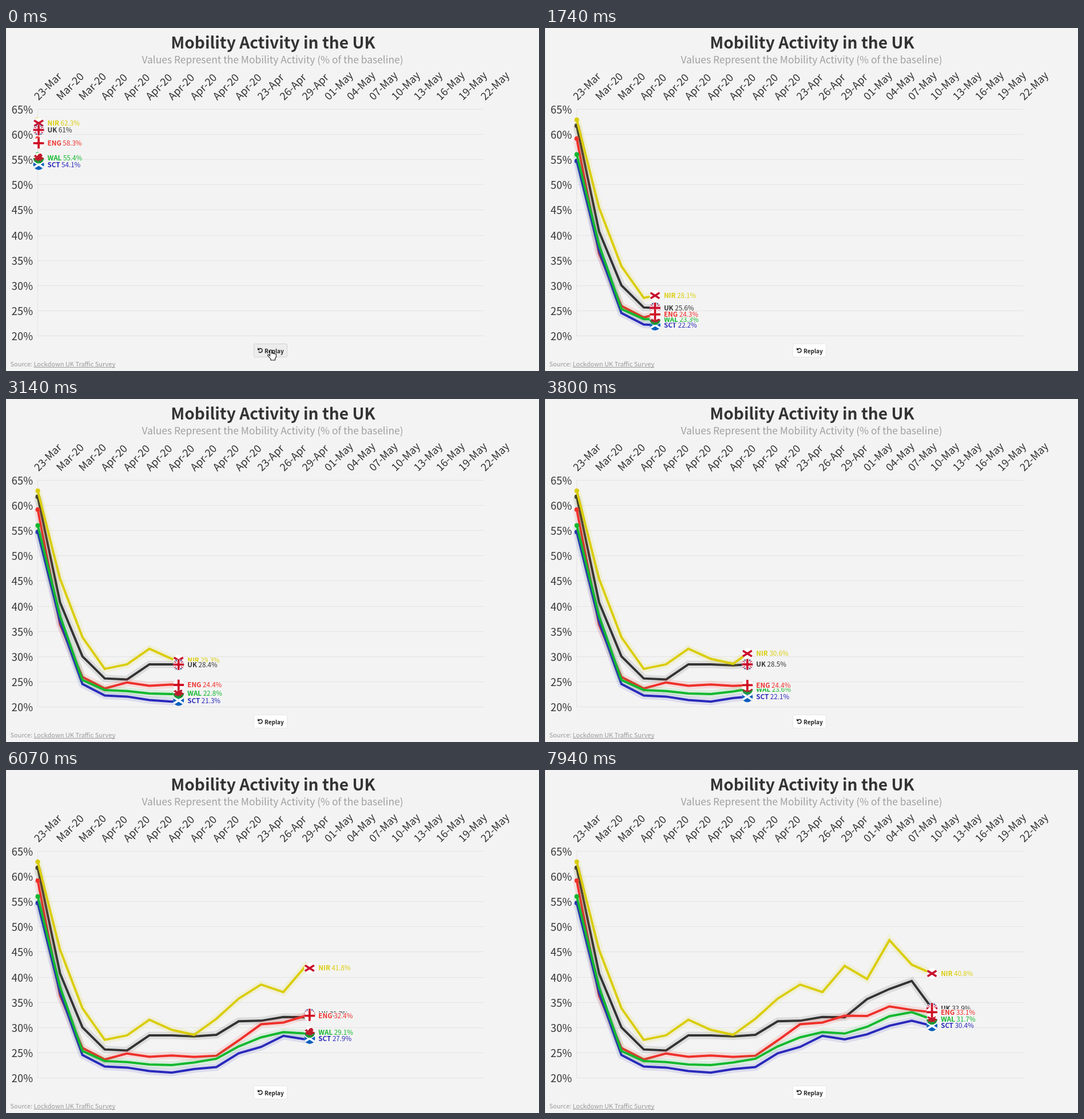
An HTML page with a canvas for the animation above (8 s loop, 932 by 601 pixels).

```html
<!DOCTYPE html>
<html lang="en">
<head>
<meta charset="utf-8">
<title>Mobility Activity in the UK</title>
<style>
  html, body { margin: 0; width: 100%; height: 100%; overflow: hidden; background: #f3f3f3; }
  canvas { display: block; }
</style>
</head>
<body>
<canvas id="stage" width="932" height="601"></canvas>
<script>
const ctx = document.getElementById('stage').getContext('2d');
const FAMILY = '"Noto Sans CJK SC", "Noto Sans CJK JP", "Noto Sans CJK", sans-serif';
const BACKGROUND = '#f3f3f3', INK = '#333';
const LOOP = 8000, FRAMES_PER_SECOND = 15, STEPS_PER_SECOND = 2, START = 0.04;
const LEFT = 55.5, STEP = 39.05, TOP = 143, PER_CENT = 8.82, FLAG_RADIUS = 9.5;

const dates = ['23-Mar', 'Mar-20', 'Mar-20', ...Array(7).fill('Apr-20'), '23-Apr', '26-Apr', '29-Apr',
  '01-May', '04-May', '07-May', '10-May', '13-May', '16-May', '19-May', '22-May'];

const series = {
  NIR: { color: '#dacd0b', values: [63, 45.5, 33.9, 27.6, 28.5, 31.6, 29.6, 28.6, 31.8, 35.8, 38.6, 37.1, 42.3, 39.7, 47.4, 42.55, 40.6] },
  UK: { color: '#333333', values: [61.8, 40.8, 30.1, 25.7, 25.5, 28.5, 28.5, 28.3, 28.6, 31.3, 31.4, 32.15, 32.1, 35.7, 37.7, 39.3, 33.3] },
  ENG: { color: '#ef302b', values: [59.25, 36.4, 26, 23.7, 24.9, 24.25, 24.5, 24.2, 24.45, 27.5, 30.7, 31.05, 32.4, 32.35, 34.25, 33.55, 33.05] },
  WAL: { color: '#12b82f', values: [56.1, 38.1, 25.4, 23.4, 23.2, 22.7, 22.6, 23.1, 23.85, 26.3, 28.1, 29.15, 28.85, 30.2, 32.3, 33.1, 31.55] },
  SCT: { color: '#2a2abb', values: [54.8, 37, 24.6, 22.3, 22.1, 21.4, 21.1, 21.8, 22.2, 24.95, 26.2, 28.4, 27.7, 28.7, 30.4, 31.4, 30.3] }
};
const lineOrder = ['UK', 'ENG', 'SCT', 'WAL', 'NIR'];
const headOrder = ['NIR', 'UK', 'SCT', 'WAL', 'ENG'];

const xAt = index => LEFT + STEP * index;
const yAt = value => TOP + (65 - value) * PER_CENT;

function valueAt(values, position) {
  const i = Math.floor(position);
  return values[i] + (values[i + 1] - values[i]) * (position - i);
}

function write(text, x, y, size, { weight = 400, color = INK, align = 'left', halo = 0 } = {}) {
  ctx.font = `${weight} ${size}px ${FAMILY}`;
  ctx.textAlign = align;
  if (halo) {
    ctx.lineJoin = 'round';
    ctx.strokeStyle = BACKGROUND;
    ctx.lineWidth = halo;
    ctx.strokeText(text, x, y);
    ctx.lineJoin = 'miter';
  }
  ctx.fillStyle = color;
  ctx.fillText(text, x, y);
  return ctx.measureText(text).width;
}

function path(points, color, width) {
  ctx.beginPath();
  points.forEach(([x, y]) => ctx.lineTo(x, y));
  ctx.strokeStyle = color;
  ctx.lineWidth = width;
  ctx.stroke();
}

function disc(x, y, radius, color) {
  ctx.beginPath();
  ctx.arc(x, y, radius, 0, 7);
  ctx.fillStyle = color;
  ctx.fill();
}

function fillRect(color, ...box) {
  ctx.fillStyle = color;
  ctx.fillRect(...box);
}

function cross(color, width) {
  path([[-12, 0], [12, 0]], color, width);
  path([[0, -12], [0, 12]], color, width);
}

function saltire(color, width, rise = 7.5) {
  path([[-12, -rise], [12, rise]], color, width);
  path([[-12, rise], [12, -rise]], color, width);
}

const flags = {
  NIR() { saltire('#c8102e', 3.6); },
  UK() {
    fillRect('#1d2a70', -10, -10, 20, 20);
    saltire('#fff', 4.5, 9);
    saltire('#c8102e', 1.4, 9);
    cross('#fff', 6.5);
    cross('#c8102e', 3.8);
  },
  ENG() { cross('#ce1124', 3.8); },
  WAL() {
    fillRect('#159a3a', -10, 0, 20, 10);
    ctx.fillStyle = '#c01a2c';
    ctx.fill(new Path2D('M-9-3L-5-6-3-3 0-7 4-8 7-4 5-2 9 0 7 3 4 2 5 6 1 4-2 6-3 3-7 5-6 1-9 1-5-1Z'));
  },
  SCT() {
    fillRect('#0b5fbd', -10, -10, 20, 20);
    saltire('#fff', 3.6);
  }
};

function drawFlag(name, x, y) {
  ctx.save();
  ctx.translate(x, y);
  disc(0, 0, FLAG_RADIUS, '#fff');
  ctx.clip();
  flags[name]();
  ctx.restore();
}

function drawFrame() {
  fillRect(BACKGROUND, 0, 0, 932, 601);
  fillRect('#e8e8e8', 0, 0, 1, 601);
  write('Mobility Activity in the UK', 467, 36, 28.1, { weight: 700, align: 'center' });
  write('Values Represent the Mobility Activity (% of the baseline)', 466, 62, 17.4, { color: '#a0a0a0', align: 'center' });

  for (let value = 65; value >= 20; value -= 5) {
    const y = Math.round(yAt(value));
    fillRect('#e3e3e3', 55, y - 1, 781, 1);
    write(value + '%', 47, y + 6.5, 18.3, { weight: 300, align: 'right' });
  }
  fillRect('#e3e3e3', 55, 142, 1, 398);

  dates.forEach((date, i) => {
    ctx.save();
    ctx.translate(xAt(i) + 1.5, 127.5);
    ctx.rotate(-Math.PI / 4);
    write(date, 0, 0, 18.3, { weight: 300 });
    ctx.restore();
  });

  const sourceWidth = write('Source: ', 7.5, 593, 11, { color: '#999' });
  const linkX = 7.5 + sourceWidth;
  const linkWidth = write('Lockdown UK Traffic Survey', linkX, 593, 11, { color: '#999' });
  fillRect('#999', linkX, 594, linkWidth, 1);
}

function drawLines(position) {
  const points = lineOrder.map(name => {
    const { values } = series[name];
    const passed = values.slice(0, Math.floor(position) + 1).map((v, i) => [xAt(i), yAt(v)]);
    return [...passed, [xAt(position), yAt(valueAt(values, position))]];
  });
  lineOrder.forEach((name, i) => {
    const { color } = series[name];
    path(points[i], color + '1c', 13);
    path(points[i], color, 4);
    disc(...points[i][0], 4, color);
  });
}

function drawHeads(position) {
  const x = xAt(position);
  for (const name of headOrder) {
    const { color, values } = series[name];
    const value = valueAt(values, position), y = yAt(value);
    drawFlag(name, x, y);
    const width = write(name + ' ', x + 15.5, y + 4.3, 11.6, { weight: 700, color, halo: 3 });
    write(+value.toFixed(1) + '%', x + 15.5 + width, y + 4.3, 11.6, { color, halo: 3 });
  }
}

function drawButton(hovered) {
  ctx.beginPath();
  ctx.roundRect(433.5, 553.5, 58, 23, 2);
  ctx.fillStyle = hovered ? '#ececec' : '#fff';
  ctx.fill();
  ctx.strokeStyle = hovered ? '#d2d2d2' : '#e6e6e6';
  ctx.lineWidth = 1;
  ctx.stroke();
  ctx.beginPath();
  ctx.arc(444.6, 565, 3.5, -2.5, 2.5);
  ctx.strokeStyle = '#222';
  ctx.lineWidth = 1.6;
  ctx.stroke();
  ctx.fillStyle = '#222';
  ctx.fill(new Path2D('M440 560v4.4h4.4Z'));
  write('Replay', 452, 569.5, 10, { weight: 700, color: '#222' });
}

function drawCursor(offset) {
  ctx.save();
  ctx.translate(457, 563 + offset);
  const hand = new Path2D('M4.5 2Q6 0 7.5 2V7Q9 5.8 10.3 7.5 12 6.5 13 8.2 15.5 7.5 15.5 10V13L13.5 16.5V19H6V17L1 11.5Q0 9.5 2 9.2L4.5 11.5Z');
  ctx.fillStyle = '#fff';
  ctx.fill(hand);
  ctx.strokeStyle = '#111';
  ctx.lineWidth = 1.1;
  ctx.stroke(hand);
  ctx.restore();
}

function draw(now) {
  const frame = Math.floor((now % LOOP) * FRAMES_PER_SECOND / 1000);
  const seconds = frame / FRAMES_PER_SECOND;
  const position = START + seconds * STEPS_PER_SECOND;
  const cursorOffset = 45 * Math.min(1, Math.max(0, (seconds - 0.13) / 0.5)) ** 2;

  drawFrame();
  drawLines(position);
  drawHeads(position);
  drawButton(cursorOffset < 14);
  drawCursor(cursorOffset);
}

const begin = performance.now();
function tick() {
  draw(performance.now() - begin);
  requestAnimationFrame(tick);
}
tick();
</script>
</body>
</html>
```
